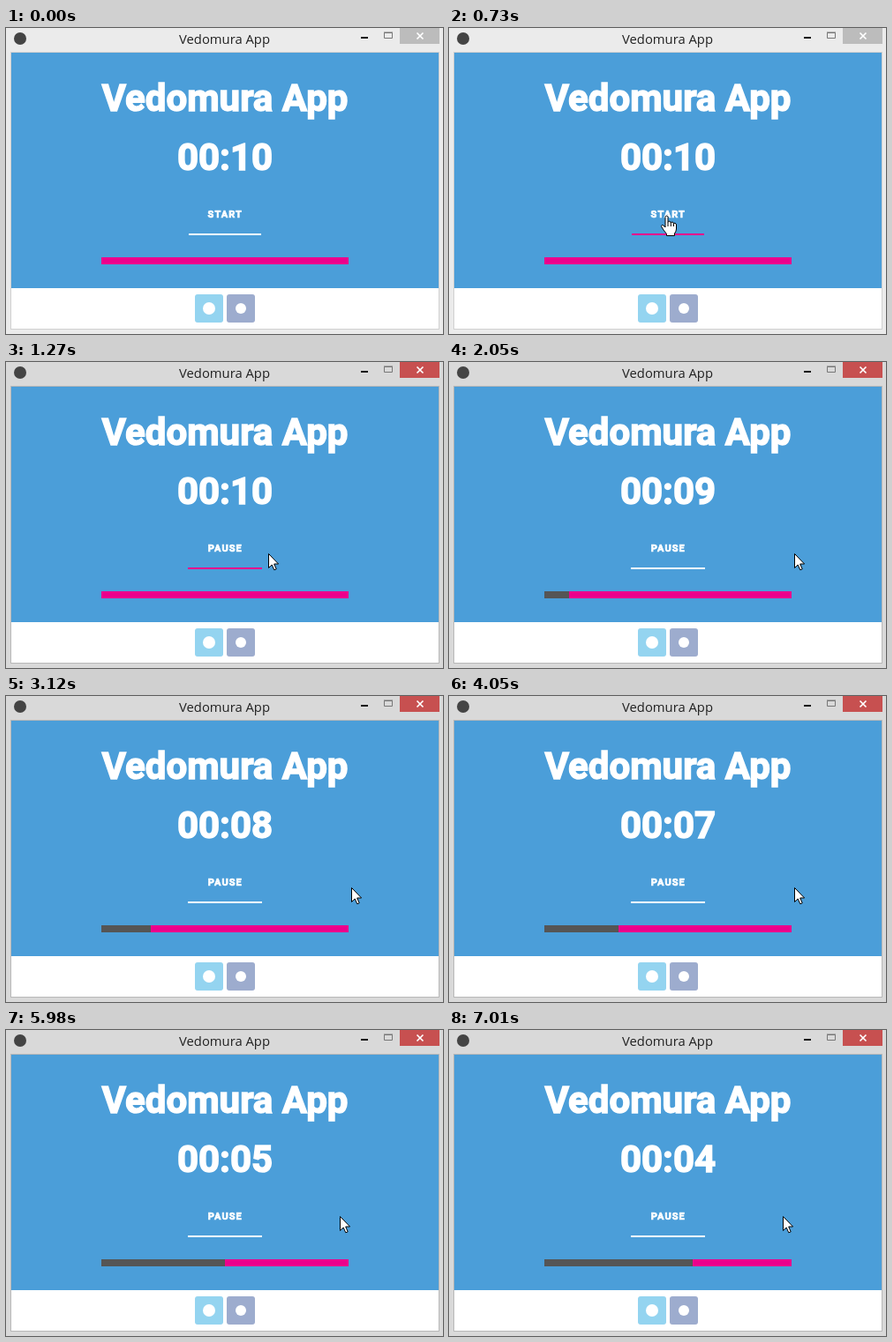
An HTML page for the animation above (8000 ms loop, 495 by 347 pixels).

```html
<!DOCTYPE html>
<html lang="en">
<head>
<meta charset="utf-8">
<title>Vedomura App</title>
<style>
  html, body { margin: 0; width: 100%; height: 100%; overflow: hidden; }
  svg { display: block; width: 495px; height: 347px; }
  text { text-anchor: middle; }
  .bar-title { font: 14.8px "Open Sans", "Noto Sans", sans-serif; fill: #222; }
  .big { font: 700 42px Roboto, sans-serif; fill: #fff; stroke: #fff; stroke-width: 1.5; }
  .label { font: 700 11px Roboto, sans-serif; letter-spacing: 1.1px; fill: #fff; stroke: #fff; stroke-width: .7; }
  .cursor { fill: #fff; stroke: #000; stroke-linejoin: round; }
</style>
</head>
<body>
<svg viewBox="0 0 495 347">
  <rect id="chrome" width="495" height="347"/>
  <circle cx="16" cy="12" r="7" fill="#444"/>
  <text class="bar-title" x="247.5" y="18">Vedomura App</text>
  <path d="M402 10h8v2h-8z" fill="#111"/>
  <path d="M428.5 5.5h9v6h-9zM428 5h10" fill="none" stroke="#777"/>
  <rect id="close" x="446" width="45" height="18"/>
  <path d="M465.5 5.5l7 7m0-7l-7 7" stroke="#fff" stroke-width="1.7"/>

  <rect id="border" x="5.5" y="27.5" width="485" height="314" fill="#fff"/>
  <rect x="6" y="28" width="484" height="267" fill="#4b9ed9"/>
  <text class="big" x="248" y="94">Vedomura App</text>
  <text class="big" id="clock" x="248" y="160.5"></text>
  <text class="label" id="label" x="248.3" y="215"></text>
  <rect id="underline" y="233" height="2"/>
  <rect x="108" y="260" width="280" height="8" fill="#ec008c"/>
  <rect id="elapsed" x="108" y="260" height="8" fill="#555"/>

  <rect x="214" y="302" width="32" height="32" rx="3" fill="#94d4f0"/>
  <circle cx="230" cy="318" r="7" fill="#fff"/>
  <rect x="250" y="302" width="32" height="32" rx="3" fill="#9dacce"/>
  <circle cx="266" cy="318" r="6" fill="#fff"/>

  <path class="cursor" id="arrow" d="M.5 .5V16.5L4.2 13 6.8 18.8 9.2 17.8 6.7 12H11.6Z"/>
  <g class="cursor" id="hand">
    <path d="M-1.5 2Q-1.5 .5 0 .5T1.5 2V8Q1.7 6.5 3.2 6.7T4.8 8.5Q5 7.3 6.5 7.6T8 9.3Q8.2 8.4 9.5 8.8T11 10.5V15.5Q10.7 18.5 9 20.5V23H0V21Q-3 17.5 -5.5 13.5Q-6.5 11.5 -5.2 10.9Q-3.8 10.5 -1.5 13.5Z"/>
    <path d="M1.5 8V12.5M4.8 8.5V12.5M8 9.3V12.5" fill="none"/>
  </g>
</svg>
<script>
const LOOP = 8000;
const $ = id => document.getElementById(id);
const set = (id, attrs) => {
  for (const key in attrs) $(id).setAttribute(key, attrs[key]);
};

// Moments when the countdown drops by one second
const ticks = [2050, 3120, 4050, 5050, 5980, 7010];

// Pointer samples: time, x, y, shape
const pointer = [
  [260, 327, 336, "arrow"], [340, 316, 312, "arrow"], [420, 299, 282, "arrow"],
  [490, 279, 254, "arrow"], [570, 262, 231, "hand"], [650, 251, 217, "hand"],
  [730, 246.5, 212.5, "hand"], [1110, 251, 213, "hand"], [1190, 270, 213, "hand"],
  [1270, 297, 217, "arrow"], [1340, 332, 217, "arrow"], [1420, 365, 217, "arrow"],
  [1570, 385, 217, "arrow"], [1650, 391, 217, "arrow"],
  [4280, 384, 214, "arrow"], [4360, 378, 211, "arrow"]
];

// Hover amount of the button underline: time, 0 to 1
const hover = [
  [0, 0], [570, .2], [650, .65], [730, 1],
  [1340, .75], [1420, .45], [1570, .1], [1650, 0]
];

const latest = (list, t) => list.filter(step => step[0] <= t).pop();
const mix = (a, b, k) => Math.round(a + (b - a) * k);

function draw(t) {
  const active = t >= 960;
  const started = t >= 1110;
  const done = ticks.filter(tick => tick <= t).length;
  const k = latest(hover, t)[1];

  set("chrome", { fill: active ? "#d9d9d9" : "#ebebeb" });
  set("close", { fill: active ? "#c75050" : "#bcbcbc" });
  set("border", { stroke: active ? "#b8b8b8" : "#d0d0d0" });

  $("clock").textContent = "00:" + String(10 - done).padStart(2, "0");
  $("label").textContent = started ? "PAUSE" : "START";
  set("underline", {
    x: started ? 206 : 207,
    width: started ? 84 : 82,
    fill: `rgb(${mix(255, 236, k)},${mix(255, 0, k)},${mix(255, 140, k)})`
  });
  set("elapsed", { width: done * 28 });

  const [, x, y, shape] = latest(pointer, t) || [];
  for (const id of ["arrow", "hand"]) {
    set(id, {
      visibility: id === shape ? "visible" : "hidden",
      transform: `translate(${x || 0} ${y || 0})`
    });
  }
}

const start = performance.now();
function loop() {
  draw((performance.now() - start) % LOOP);
  requestAnimationFrame(loop);
}
loop();
</script>
</body>
</html>
```
